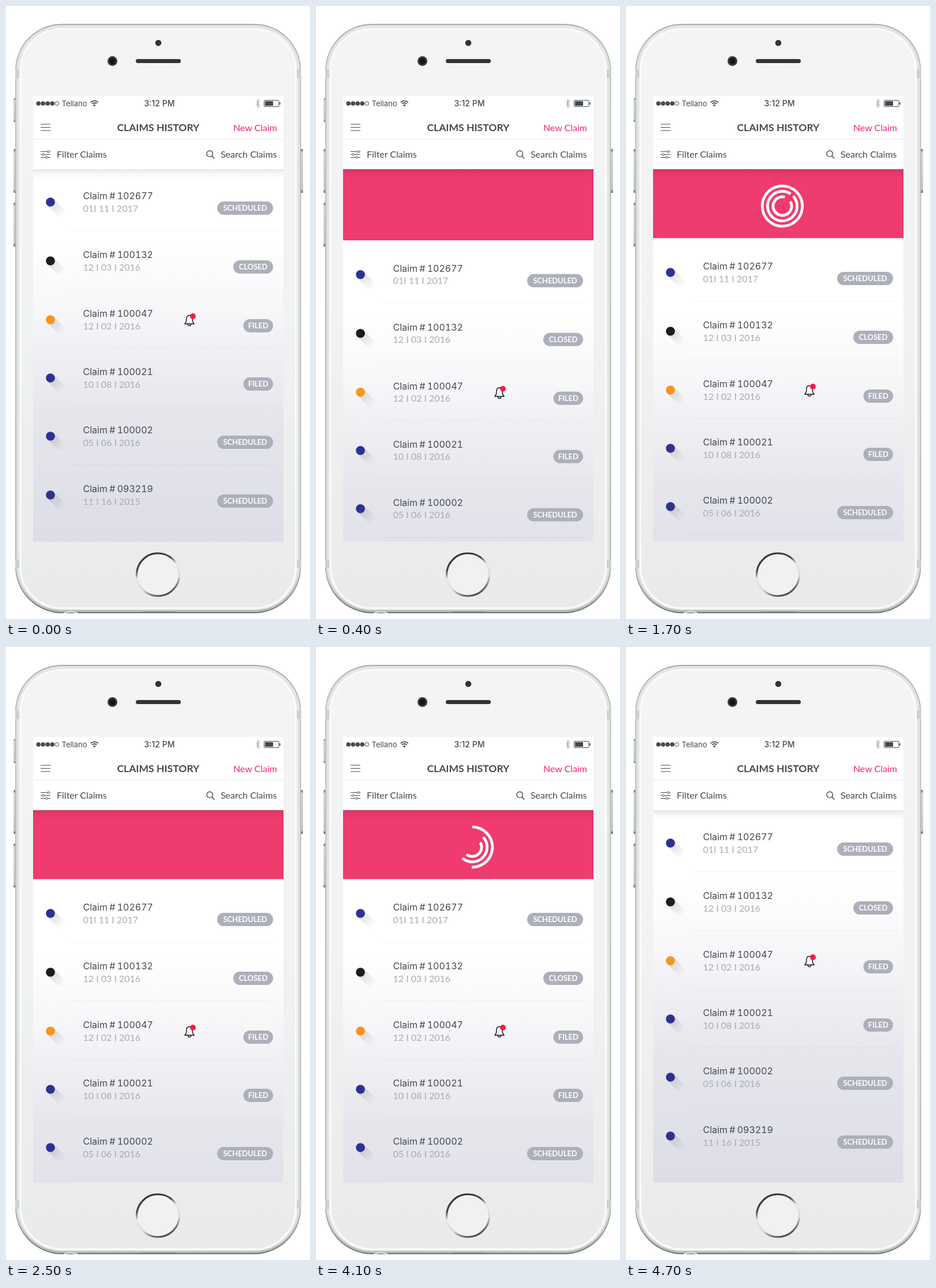
An HTML page for the animation above (4.8 s loop, 527 px wide and 1063 px high).

```html
<!DOCTYPE html>
<html lang="en">
<head>
<meta charset="utf-8">
<title>Claims history</title>
<style>
  html, body { margin: 0; width: 100%; height: 100%; overflow: hidden; background: #fff; }
  svg { display: block; width: 100vw; height: 100vh; }
  text { font-family: Lato, sans-serif; font-size: 16px; fill: #434a51; }
  .sys { font-family: Inter, sans-serif; }
  .claim { font-variant-numeric: tabular-nums; word-spacing: -1px; }
  .title { font-size: 17.5px; font-weight: 700; }
  .date { fill: #a9abb2; }
  .pill { font-size: 12.9px; font-weight: 700; fill: #fff; text-anchor: middle; }
  .line { fill: none; stroke: #434a51; stroke-width: 1.2; }
  .ring { fill: none; stroke: #fff; stroke-width: 4.8; }
</style>
</head>
<body>
<svg viewBox="0 0 527 1063">
  <defs>
    <linearGradient id="rim" x2="0" y2="1">
      <stop offset="0" stop-color="#989d9b"/><stop offset=".08" stop-color="#b4b9b6"/>
      <stop offset=".92" stop-color="#a9aeab"/><stop offset="1" stop-color="#6f7472"/>
    </linearGradient>
    <linearGradient id="bevel" x2="0" y2="1">
      <stop offset="0" stop-color="#dde1df"/><stop offset=".93" stop-color="#d8dcda"/>
      <stop offset="1" stop-color="#b4b9b6"/>
    </linearGradient>
    <linearGradient id="face" x2="0" y2="1">
      <stop offset="0" stop-color="#f4f4f4"/><stop offset=".5" stop-color="#f1f2f2"/>
      <stop offset="1" stop-color="#e9ebea"/>
    </linearGradient>
    <linearGradient id="button" x2="0" y2="1">
      <stop offset="0" stop-color="#666"/><stop offset=".08" stop-color="#d3d6d5"/>
      <stop offset=".92" stop-color="#c5c8c7"/><stop offset="1" stop-color="#555"/>
    </linearGradient>
    <linearGradient id="home" x1=".3" y1="0" x2=".7" y2="1">
      <stop offset="0" stop-color="#333"/><stop offset=".25" stop-color="#444"/>
      <stop offset=".42" stop-color="#e8e8e8"/><stop offset=".7" stop-color="#d8d8d8"/>
      <stop offset=".9" stop-color="#666"/><stop offset="1" stop-color="#444"/>
    </linearGradient>
    <linearGradient id="paper" x2="0" y2="1">
      <stop offset="0" stop-color="#fff"/><stop offset=".2" stop-color="#fff"/>
      <stop offset=".4" stop-color="#f6f6f9"/><stop offset=".65" stop-color="#e6e6ec"/>
      <stop offset="1" stop-color="#dddde8"/>
    </linearGradient>
    <linearGradient id="shade" x2="0" y2="1">
      <stop offset="0" stop-opacity=".1"/><stop offset=".4" stop-opacity=".035"/>
      <stop offset="1" stop-opacity="0"/>
    </linearGradient>
    <linearGradient id="cast" gradientUnits="userSpaceOnUse" x1="0" y1="0" x2="23" y2="23">
      <stop offset="0" stop-color="#555" stop-opacity=".2"/>
      <stop offset="1" stop-color="#555" stop-opacity="0"/>
    </linearGradient>
    <clipPath id="view"><rect x="47" y="283" width="434" height="646"/></clipPath>
    <clipPath id="floor"><rect width="527" height="1053"/></clipPath>
  </defs>

  <g fill="url(#button)">
    <rect x="13" y="160" width="5" height="41" rx="2"/>
    <rect x="13" y="248" width="6" height="76" rx="2"/>
    <rect x="13" y="341" width="6" height="76" rx="2"/>
    <rect x="509" y="248" width="6" height="76" rx="2"/>
  </g>
  <g clip-path="url(#floor)">
    <rect x="16" y="31" width="495.500" height="1022" rx="81" fill="url(#rim)"/>
    <rect x="17.500" y="32.500" width="492.500" height="1018.500" rx="79.500" fill="url(#bevel)"/>
    <rect x="20.500" y="35.500" width="486.500" height="1012" rx="76" fill="#e6e9e7"/>
    <path d="M16 110h7v15h-7zM504 110h7v15h-7zM16 960h7v14h-7zM504 960h7v14h-7z" fill="#ccd1ce"/>
    <rect x="23.500" y="38.500" width="480.500" height="1007" rx="73" fill="#fbfbfb"/>
    <rect x="26.500" y="41" width="474.500" height="1002" rx="71" fill="url(#face)"/>
    <path d="M235 1051.500h59" stroke="#777" stroke-width="2"/>
    <path d="M100 1053q12 -5 24 0" fill="none" stroke="#fff" stroke-width="1.500"/>
  </g>
  <circle cx="264" cy="64" r="5.300" fill="#333"/>
  <circle cx="184.500" cy="95.500" r="8.500" fill="#3b3b3b"/>
  <circle cx="184.500" cy="95.500" r="5.500" fill="#151515"/>
  <rect x="225" y="92" width="78" height="7" rx="3.500" fill="#333"/>
  <circle cx="263.500" cy="986" r="37" fill="#f0f1f1" stroke="url(#home)" stroke-width="3.200"/>

  <rect x="47" y="156" width="434" height="773" fill="#fff"/>
  <g clip-path="url(#view)">
    <rect x="47" y="283" width="434" height="140" fill="#ef3b6e" stroke="#c92f5b"/>
    <g id="loader" transform="translate(271 347)">
      <path class="ring"/><path class="ring"/><path class="ring"/>
      <path id="hand" fill="#fff"/>
    </g>
    <g id="list">
      <rect x="47" y="279.500" width="434" height="1" fill="#c92f5b" opacity=".5"/>
      <rect x="47" y="280.500" width="434" height="649" fill="url(#paper)"/>
    </g>
    <rect x="47" y="283" width="434" height="17" fill="url(#shade)"/>
  </g>

  <g fill="#434a51">
    <circle cx="56.200" cy="169" r="3.800"/><circle cx="64.200" cy="169" r="3.800"/>
    <circle cx="72.200" cy="169" r="3.800"/><circle cx="80.200" cy="169" r="3.800"/>
    <path d="M153.200 174.500l-2.300 -2.700q2.300 -1.900 4.600 0z"/>
  </g>
  <g class="line">
    <circle cx="88.200" cy="169" r="3.300" stroke-width="1"/>
    <path d="M149 169.700q4.200 -3.400 8.400 0M146.700 167q6.500 -5.300 13 0" stroke-width="1.700"/>
    <path d="M433 165.500l7 7l-3.500 3.500v-14l3.500 3.500l-7 7" stroke="#8b8f94" stroke-width="1"/>
    <rect x="447.500" y="163.500" width="25.500" height="11" rx="1.500" stroke-width="1"/>
    <path d="M60 205h17M60 210.500h17M60 216h17"/>
    <path d="M60 252.500h11.500M75.500 252.500h1.500M60 257.500h2.500M66.500 257.500h10.500M60 262.500h8.500M72.500 262.500h4.500" stroke-width="1"/>
    <g stroke-width="1">
      <circle cx="73.500" cy="252.500" r="1.800"/><circle cx="64.500" cy="257.500" r="1.800"/>
      <circle cx="70.500" cy="262.500" r="1.800"/>
    </g>
    <path d="M357 260.300l4.300 4.200" stroke-width="1.600"/>
    <circle cx="353.200" cy="256.200" r="5.200" stroke-width="1.400"/>
  </g>
  <path d="M449 165h14v8h-14zM474 167h1.500v4h-1.500z" fill="#434a51"/>
  <path d="M47 231h434" stroke="#eeeef0" stroke-width="1.500"/>
  <text class="sys" x="96.500" y="174" style="font-size:13px">Tellano</text>
  <text class="sys" x="266" y="174" text-anchor="middle" style="font-size:14px;font-weight:500">3:12 PM</text>
  <text class="title" x="264" y="217" text-anchor="middle">CLAIMS HISTORY</text>
  <text x="470" y="216.500" text-anchor="end" style="fill:#e8296a">New Claim</text>
  <text x="88" y="263.300">Filter Claims</text>
  <text x="469.500" y="263.300" text-anchor="end">Search Claims</text>
</svg>

<script>
const LOOP = 4800, STEP = 100, OPEN = 122;
const BLUE = '#2e3192', BLACK = '#1c1c1c', ORANGE = '#f7941e';
const PILL_WIDTH = { SCHEDULED: 97, CLOSED: 69, FILED: 51.5 };

const claims = [
  [340, '102677', '01I 11 I 2017', 'SCHEDULED', BLUE],
  [442, '100132', '12 I 03 I 2016', 'CLOSED', BLACK],
  [544, '100047', '12 I 02 I 2016', 'FILED', ORANGE],
  [645, '100021', '10 I 08 I 2016', 'FILED', BLUE],
  [746, '100002', '05 I 06 I 2016', 'SCHEDULED', BLUE],
  [848, '093219', '11 I 16 I 2015', 'SCHEDULED', BLUE]
];

const bell = `
  <path d="M309.800 7.300q3 -2.500 3 -8q0 -7 5.200 -7t5.200 7q0 5.500 3 8z
           M315 7.500q.5 3 3 3t3 -3" fill="none" stroke="#1c1c1c" stroke-width="1.500" stroke-linejoin="round"/>
  <circle cx="324" cy="-6" r="4.900" fill="#ff1744"/>`;

const list = document.getElementById('list');
list.innerHTML += claims.map(([y, id, date, state, color], i) => {
  const w = PILL_WIDTH[state];
  return `<g transform="translate(0 ${y})">
    <path transform="translate(77 0)" d="M5.500 -5.500L28 17L17 28L-5.500 5.500z" fill="url(#cast)"/>
    <circle cx="77" r="7.800" fill="${color}"/>
    <text class="sys claim" x="133.500" y="-5.200">Claim # ${id}</text>
    <text class="date" x="133.500" y="16.700">${date}</text>
    <rect x="${463 - w}" y="-1" width="${w}" height="23" rx="11.500" fill="#adb0ba"/>
    <text class="pill" x="${463 - w / 2}" y="15.200">${state}</text>
    ${color === ORANGE ? bell : ''}
    ${i < claims.length - 1 ? '<path d="M112 49.500h360" stroke="#000" stroke-opacity=".04"/>' : ''}
  </g>`;
}).join('');

const clamp = u => Math.max(0, Math.min(1, u));
const span = (t, from, to) => clamp((t - from) / (to - from));

// Radius, start angle and sweep in degrees, clockwise from the top
const rings = [
  { r: 34.8, from: 0, sweep: 360, start: 820, end: 1200 },
  { r: 25.6, from: 47, sweep: 347, start: 620, end: 945 },
  { r: 16.1, from: 60, sweep: 315, start: 500, end: 800 }
];
const arcs = document.querySelectorAll('.ring');
const hand = document.getElementById('hand');

function arc(r, from, sweep) {
  if (sweep <= 0) return '';
  const point = a => {
    const q = a * Math.PI / 180;
    return `${r * Math.sin(q)} ${-r * Math.cos(q)}`;
  };
  const half = from + sweep / 2;
  return `M${point(from)}A${r} ${r} 0 0 1 ${point(half)}A${r} ${r} 0 0 1 ${point(from + sweep)}`;
}

function shift(t) {
  if (t >= 4300) return OPEN * (1 - span(t, 4300, 4700) ** 3.4);
  const u = span(t, 0, 474) - 1;
  return OPEN * (1 + 2.7 * u ** 3 + 1.7 * u ** 2);
}

function drawLoader(t) {
  // The second build repeats the first, 2100 ms later
  const build = t < 2350 ? t : t - 2100;
  const erase = t < 2350 ? span(t, 1600, 2300) : span(t, 3700, 4400);
  const left = 1 - span(erase, 0.15, 1);
  rings.forEach(({ r, from, sweep, start, end }, i) => {
    arcs[i].setAttribute('d', arc(r, from, sweep * span(build, start, end) * left));
  });
  const k = span(build, 1000, 1200) * (1 - span(erase, 0, 0.14));
  const tip = 5 + 14 * k;
  hand.setAttribute('d', k > 0
    ? `M3 -3L5 -10L${tip - 3} ${-tip - 1}L${tip + 1} ${-tip + 3}L10 -5z` : '');
}

function draw(now) {
  const t = Math.floor(now % LOOP / STEP) * STEP;
  list.setAttribute('transform', `translate(0 ${shift(t)})`);
  drawLoader(t);
}

const begin = performance.now();
function tick() {
  draw(performance.now() - begin);
  requestAnimationFrame(tick);
}
tick();
</script>
</body>
</html>
```
